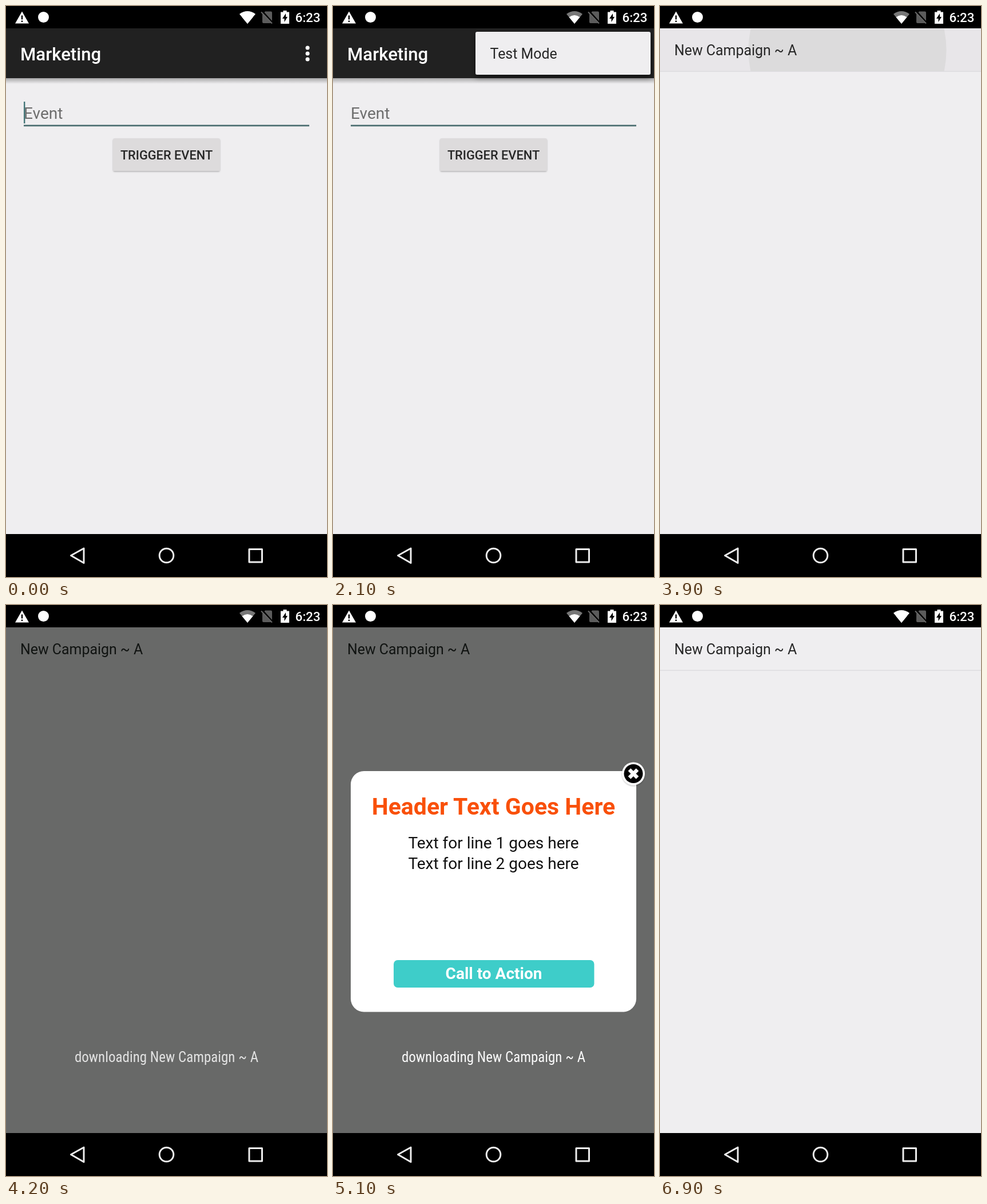
An HTML page for the animation above (7.2 s loop, 561 by 997 pixels).

```html
<!DOCTYPE html>
<html lang="en">
<head>
<meta charset="utf-8">
<title>Campaign preview</title>
<style>
  html, body { margin: 0; width: 100%; height: 100%; overflow: hidden; background: #000; }
  svg { display: block; width: 100%; height: 100%; }
  text { font: 24.9px Roboto, sans-serif; fill: #272727; white-space: pre; }
  .mid { text-anchor: middle; }
  .medium { font-weight: 500; }
  .bold { font-weight: 700; }
  #toast { font-family: "Roboto Condensed", Roboto, sans-serif; font-size: 25px; font-stretch: 75%; }
</style>
</head>
<body>
<svg viewBox="0 0 561 997">
  <defs>
    <linearGradient id="fade" x2="0" y2="1">
      <stop stop-color="#000" stop-opacity=".3"/>
      <stop offset="1" stop-color="#000" stop-opacity="0"/>
    </linearGradient>
    <filter id="soft" x="-20%" y="-30%" width="140%" height="180%">
      <feDropShadow dx="0" dy="5" stdDeviation="5" flood-opacity=".45"/>
    </filter>
    <filter id="small" x="-20%" y="-20%" width="140%" height="150%">
      <feDropShadow dx="0" dy="1.5" stdDeviation="1" flood-opacity=".25"/>
    </filter>
    <clipPath id="row"><rect y="40" width="561" height="74"/></clipPath>
    <clipPath id="window"><rect width="561" height="962"/></clipPath>
  </defs>

  <rect width="561" height="997"/>
  <rect y="39" width="561" height="883" fill="#efeef0"/>

  <!-- Event screen -->
  <g id="home">
    <rect y="126" width="561" height="10" fill="url(#fade)"/>
    <rect y="39" width="561" height="87" fill="#212121"/>
    <text class="medium" x="25" y="95" style="font-size:31.2px;fill:#fff">Marketing</text>
    <g fill="#fff">
      <circle cx="527" cy="73" r="3.5"/><circle cx="527" cy="83" r="3.5"/><circle cx="527" cy="93" r="3.5"/>
    </g>
    <text x="31" y="197" style="font-size:28px;fill:#6d6d6d">Event</text>
    <rect x="31" y="207.5" width="499" height="2.7" fill="#4a6d70"/>
    <rect id="cursor" x="31" y="167" width="2.4" height="38" fill="#437678"/>
    <rect x="187" y="231" width="187" height="57" rx="3" fill="#dddbdc" filter="url(#small)"/>
    <text class="medium mid" x="280.5" y="267.5" style="font-size:21.8px">TRIGGER EVENT</text>
    <g id="menu">
      <rect x="249" y="45" width="306" height="75" rx="3" fill="#efeef0" filter="url(#soft)"/>
      <text x="274.5" y="92">Test Mode</text>
    </g>
  </g>

  <!-- Campaign list -->
  <g id="list">
    <rect y="39" width="561" height="883" fill="#efeef0"/>
    <g id="ripple" clip-path="url(#row)">
      <rect y="40" width="561" height="74" fill="#e8e6e9"/>
      <circle cx="327.5" cy="77" r="173" fill="#dcdbdc"/>
    </g>
    <rect y="113.5" width="561" height="1.5" fill="#dedde0"/>
    <rect id="dim" y="39" width="561" height="883" fill="#686968"/>
    <text id="item" x="25" y="85.5">New Campaign ~ A</text>
    <text id="toast" class="mid" x="280.5" y="798">downloading New Campaign ~ A</text>
  </g>

  <g clip-path="url(#window)">
    <g id="card">
      <rect x="31" y="290" width="499" height="420.5" rx="23" fill="#fff"/>
      <text class="bold mid" x="280.5" y="365.5" style="font-size:41px;fill:#f9500a">Header Text Goes Here</text>
      <g class="mid">
        <text x="280.5" y="425" style="font-size:28px;fill:#111">Text for line 1 goes here</text>
        <text x="280.5" y="461" style="font-size:28px;fill:#111">Text for line 2 goes here</text>
      </g>
      <rect x="106" y="620" width="350.5" height="48" rx="7" fill="#3ecdc9"/>
      <text class="bold mid" x="281" y="653" style="font-size:28px;fill:#fff">Call to Action</text>
      <g transform="translate(525 294.5)">
        <circle r="20" fill="#fff" filter="url(#small)"/>
        <circle r="16.5"/>
        <path d="M-7-7 7 7M7-7-7 7" stroke="#fff" stroke-width="6.5"/>
      </g>
    </g>
  </g>

  <!-- Navigation bar -->
  <g fill="none" stroke="#ededed" stroke-width="3" stroke-linejoin="round">
    <path d="M113.5 959.5 136 947V972.5Z"/>
    <circle cx="280.5" cy="959.5" r="12.3"/>
    <rect x="425" y="948.5" width="22.5" height="22.5"/>
  </g>

  <!-- Status bar -->
  <path d="M28 9.5 40 30.5H16Z" fill="#fff"/>
  <path d="M28 16.5V23.5M28 25.5V28" stroke="#000" stroke-width="2.4"/>
  <circle cx="65.5" cy="19.5" r="9.5" fill="#fff"/>
  <path id="signal" d="M408 14Q422 4 436 14L422 31Z"/>
  <path d="M412.5 19.5Q422 12.5 431.5 19.5L422 31Z" fill="#fff"/>
  <path d="M453 9.5H463Q465 9.5 465 11.5V28Q465 30 463 30H450Q448 30 448 28V14.5Z" fill="#5c5c5c"/>
  <path d="M447 9 466 30" stroke="#000" stroke-width="4"/>
  <path d="M446 10.5 465 30.5" stroke="#666" stroke-width="2"/>
  <path d="M484.5 8H490.5V10.5H495V31H480V10.5H484.5Z" fill="#fff"/>
  <path d="M489 13 483 22H486.5V28L492 19H489Z"/>
  <text class="medium" x="505.5" y="28" style="font-size:22.3px;fill:#fff">6:23</text>
</svg>
<script>
  const $ = id => document.getElementById(id);
  const show = (id, on) => $(id).style.display = on ? '' : 'none';

  // Without a condensed face, use a smaller size of the regular one.
  if ($('toast').getComputedTextLength() > 335) $('toast').style.fontSize = '22px';

  function draw(now) {
    const t = now % 7200;
    const during = (from, to) => t >= from && t < to;
    const dimmed = during(4200, 6900);

    show('home', t < 3000);
    show('cursor', t < 600 || during(900, 1500));
    show('menu', during(1800, 2700));
    show('list', t >= 2700);
    $('list').style.opacity = t < 3000 ? .7 : 1;
    show('ripple', during(3900, 4200));
    show('dim', dimmed);
    show('toast', dimmed);
    $('item').style.fill = dimmed ? '#101311' : '#272727';
    $('toast').style.fill = t < 4500 ? '#e2e2e2' : '#fafafa';
    $('signal').style.fill = during(2100, 6900) ? '#777' : '#fff';

    show('card', during(4800, 6900));
    const drop = t < 5100 ? 39 : t < 6600 ? 0 : 598;
    $('card').setAttribute('transform', `translate(0 ${drop})`);
    requestAnimationFrame(draw);
  }
  draw(0);
</script>
</body>
</html>
```
